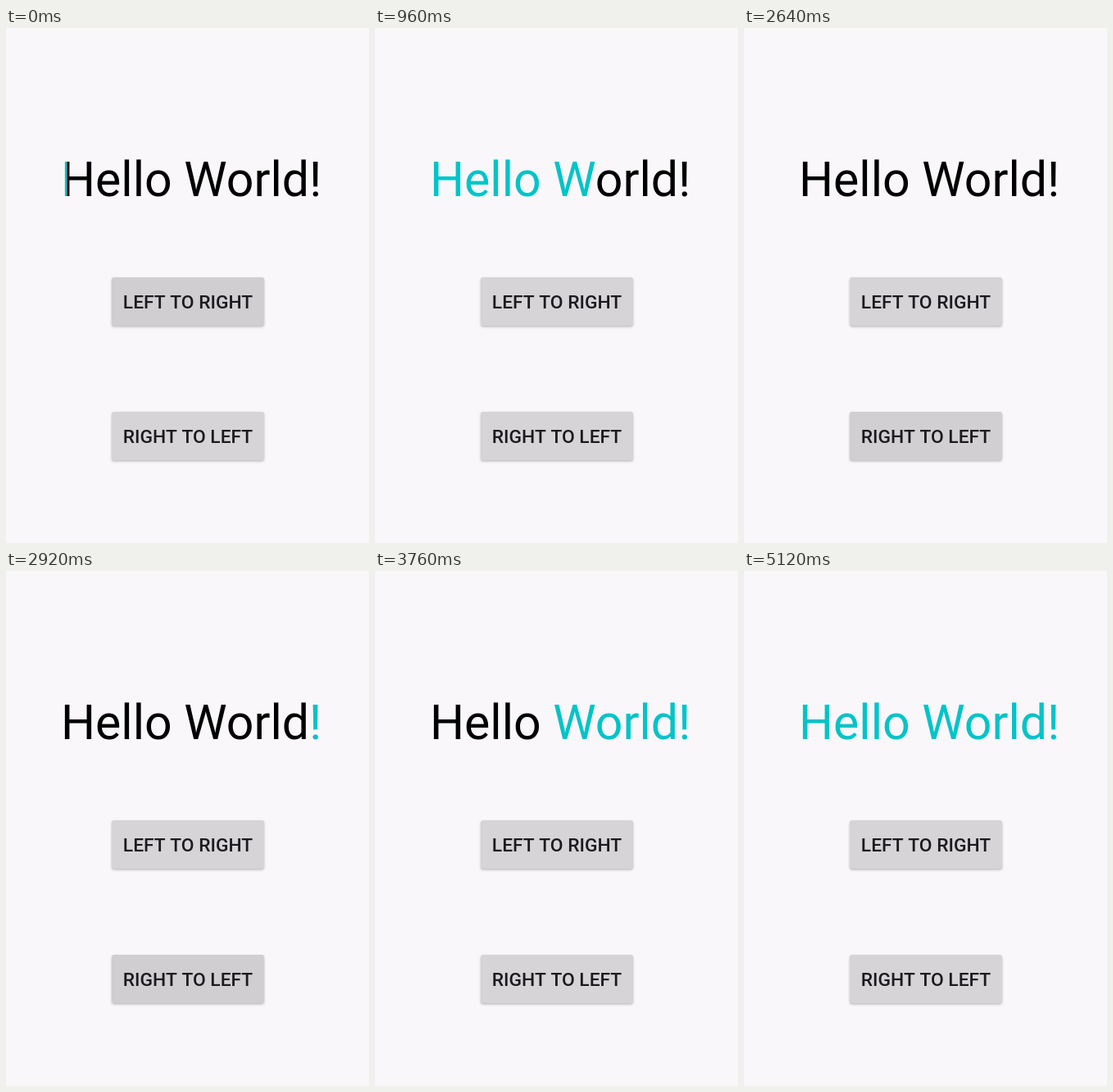
Recreate the animation shown at these times as an HTML page with a canvas. Size 443 by 628 pixels, loop 6.16 s.

```html
<!DOCTYPE html>
<html lang="en">
<head>
<meta charset="utf-8">
<title>Text sweep</title>
<style>
  html, body { margin: 0; width: 100%; height: 100%; overflow: hidden; background: #f9f7fa; }
  canvas { display: block; width: 443px; height: 628px; }
</style>
</head>
<body>
<canvas id="stage"></canvas>
<script>
const W = 443, H = 628, LOOP = 6160, SWEEP = 2000;
const TEAL = '#00c4c8', BLACK = '#000', INK = '#1b1a1e';
const LEFT = 65.5, RIGHT = 386.5;
const FONT = 'Roboto, Arial, sans-serif';

const canvas = document.getElementById('stage');
const ratio = window.devicePixelRatio || 1;
canvas.width = Math.round(W * ratio);
canvas.height = Math.round(H * ratio);
const ctx = canvas.getContext('2d');

const clamp = v => Math.min(1, Math.max(0, v));
const ease = v => (1 - Math.cos(Math.PI * clamp(v))) / 2;

// Press highlight: fades in, holds, fades out
const press = (t, down, up) => clamp((t - down) / 100) * (1 - clamp((t - up) / 400));

function title(color, from, to) {
  if (to <= from) return;
  ctx.save();
  ctx.beginPath();
  ctx.rect(from, 140, to - from, 90);
  ctx.clip();
  ctx.font = `400 59px ${FONT}`;
  ctx.fillStyle = color;
  ctx.fillText('Hello World!', 226.1, 205);
  ctx.restore();
}

function button(label, y, pressed) {
  const tone = [214, 212, 215].map(c => Math.round(c - 6 * pressed));
  ctx.save();
  ctx.shadowColor = 'rgba(0,0,0,0.25)';
  ctx.shadowBlur = 3 * ratio;
  ctx.shadowOffsetY = 1.5 * ratio;
  ctx.fillStyle = `rgb(${tone})`;
  ctx.beginPath();
  ctx.roundRect(129, y, 186, 59, 3);
  ctx.fill();
  ctx.restore();
  ctx.font = `500 22.8px ${FONT}`;
  ctx.fillStyle = INK;
  ctx.fillText(label, 222, y + 38);
}

function draw(t) {
  ctx.setTransform(ratio, 0, 0, ratio, 0, 0);
  ctx.fillStyle = '#f9f7fa';
  ctx.fillRect(0, 0, W, H);
  ctx.textAlign = 'center';
  ctx.textBaseline = 'alphabetic';

  const forward = t < 2600;
  const p = ease((t - (forward ? -213 : 2683)) / SWEEP);
  const done = p > 0.996;
  const edge = forward
    ? (done ? W : LEFT + p * (RIGHT - LEFT))
    : (done ? 0 : p > 0 ? RIGHT - p * (RIGHT - LEFT) : W);
  title(forward ? TEAL : BLACK, 0, edge);
  title(forward ? BLACK : TEAL, edge, W);

  button('LEFT TO RIGHT', 304, press(t, -300, 60));
  button('RIGHT TO LEFT', 468, press(t, 2560, 2940));
}

const start = performance.now();
function frame(now) {
  draw(Math.max(0, now - start) % LOOP);
  requestAnimationFrame(frame);
}
draw(0);
requestAnimationFrame(frame);
</script>
</body>
</html>
```
